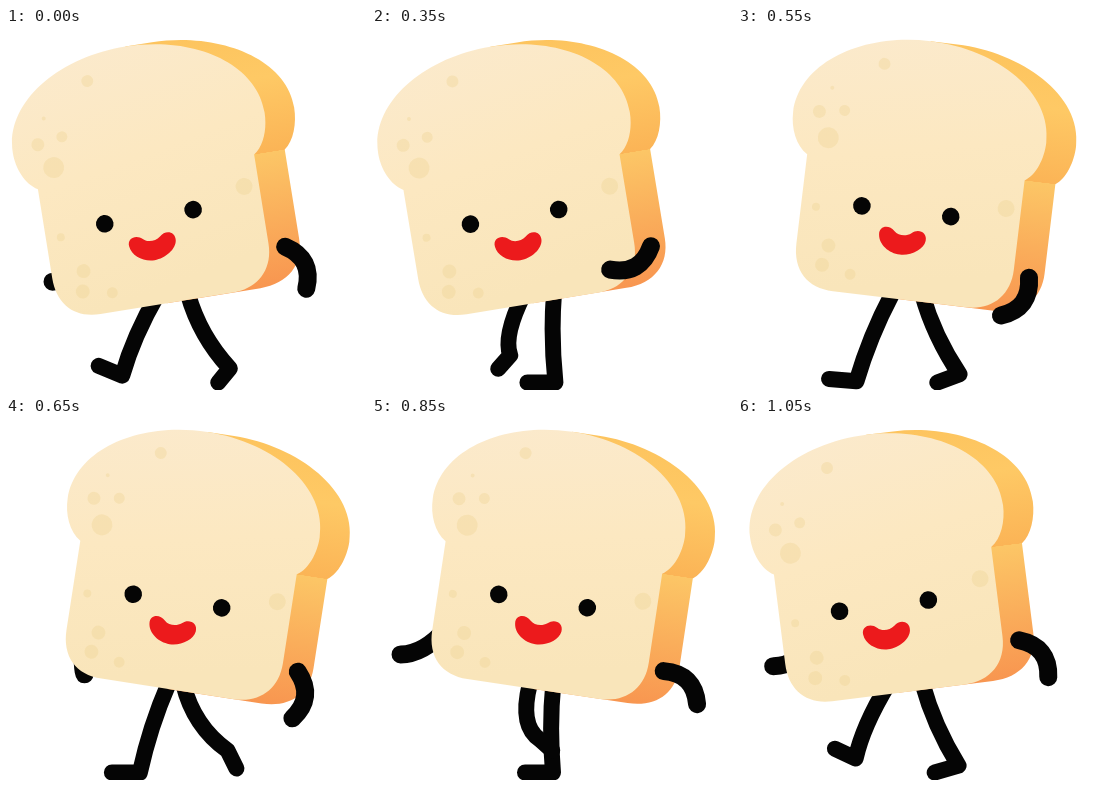
Write an HTML page that moves like this. It is 360 px wide and 362 px high and loops after 1.1 s.

```html
<!DOCTYPE html>
<html lang="en">
<head>
<meta charset="utf-8">
<title>Walking toast</title>
<style>
  html, body { margin: 0; width: 100%; height: 100%; overflow: hidden; background: #fff; }
  svg { display: block; width: 100vw; height: 100vh; }
  .limb { fill: none; stroke: #050505; stroke-linecap: round; stroke-linejoin: round; }
  .leg { stroke-width: 16; }
  .arm { stroke-width: 18; }
</style>
</head>
<body>
<svg viewBox="0 0 360 362">
  <defs>
    <linearGradient id="face" x1="0" y1="0" x2=".2" y2="1">
      <stop offset="0" stop-color="#fbeacd"/>
      <stop offset=".5" stop-color="#fce8c1"/>
      <stop offset="1" stop-color="#f9e5ba"/>
    </linearGradient>
    <linearGradient id="crust" gradientUnits="userSpaceOnUse" x1="0" y1="13" x2="0" y2="273">
      <stop offset="0" stop-color="#fdc45e"/>
      <stop offset=".2" stop-color="#fec965"/>
      <stop offset=".488" stop-color="#fbb456"/>
      <stop offset=".489" stop-color="#fcc666"/>
      <stop offset="1" stop-color="#f89650"/>
    </linearGradient>
  </defs>
  <path id="legB" class="limb leg"/>
  <path id="legA" class="limb leg"/>
  <path id="armL" class="limb arm"/>
  <g id="body">
    <path fill="url(#crust)" d="M161 13H188C252 13 318 48 318 100C318 116 312 133 302 140V230C302 257 284 273 256 273H161Z"/>
    <path fill="url(#face)" d="M52 140C40 133 33 116 33 100C33 50 92 13 161 13S288 50 288 100C288 116 282 133 271 140V230C271 257 253 273 228 273H94C68 273 52 257 52 230Z"/>
    <g id="spots" fill="#efd596" opacity=".38"></g>
    <circle cx="112.500" cy="184.700" r="8.800" fill="#050505"/>
    <circle cx="202" cy="184.700" r="8.800" fill="#050505"/>
    <path fill="#ec1a1c" d="M133 211C132 202 142 200 148 206C152 210 160 210 165 206C171 200 181 203 180 212C179 221 167 228.500 156 228.500S134 221 133 211Z"/>
  </g>
  <path id="armR" class="limb arm"/>
</svg>
<script>
const LOOP = 1100, STEP = 50;
const PIVOT = { x: 175, y: 276 };
const { sin, cos, max, min, tanh, PI } = Math;
const el = id => document.getElementById(id);
const rad = degrees => degrees * PI / 180;

// Cosine over the loop, equal to 1 at the time "peak".
const wave = (t, peak, cycles = 1) => cos(2 * PI * cycles * (t - peak) / LOOP);

// The body rocks quickly between two held leans.
const tilt = t => 9.6 * tanh(2.5 * (wave(t, 732) - 0.11)) - 0.4;

function onBody(x, y, degrees) {
  const c = cos(rad(degrees)), s = sin(rad(degrees));
  const dx = x - PIVOT.x, dy = y - PIVOT.y;
  return [PIVOT.x + dx * c - dy * s, PIVOT.y + dx * s + dy * c];
}

const setPath = (id, d) => el(id).setAttribute("d", d);

// One step cycle: the foot slides right on the ground, then lifts and swings left.
function drawLeg(id, t) {
  const lift = max(0, 0.3 + wave(t, 820)) / 1.3;
  const hipX = 168 - 18 * wave(t, -80);
  const ankleX = 170 - 53 * wave(t, 20) + 5 * wave(t, 157, 2);
  const ankleY = 354.5 - 33 * lift;
  const kneeX = (hipX + ankleX) / 2 - 4 - 12 * lift;
  const drop = rad(190 * lift * wave(t, 720));
  const foot = 28 - 12 * lift;
  const toeX = ankleX - foot * cos(drop);
  const toeY = min(354.5, ankleY + foot * sin(drop));
  setPath(id, `M${hipX} 266Q${kneeX} 308 ${ankleX} ${ankleY}L${toeX} ${toeY}`);
}

// The near arm swings like a bent pendulum.
function drawNearArm(t, [x, y]) {
  const length = 47, bend = 20;
  const swing = rad(56 * wave(t, 930) - 5);
  const dx = sin(swing), dy = cos(swing);
  const elbow = [x + dx * length / 2 + dy * bend, y + dy * length / 2 - dx * bend];
  setPath("armR", `M${x} ${y}Q${elbow.join(" ")} ${x + dx * length} ${y + dy * length}`);
}

// The far arm reaches out from behind the slice.
function drawFarArm(t, [x, y]) {
  const handX = 77 - 54 * wave(t, 930);
  const handY = 246 + 11 * wave(t, 620, 2);
  setPath("armL", `M${x} ${y}Q${(x + handX) / 2} ${handY} ${handX} ${handY}`);
}

function draw(t) {
  const angle = tilt(t);
  el("body").setAttribute("transform", `rotate(${angle} ${PIVOT.x} ${PIVOT.y})`);
  drawLeg("legA", t);
  drawLeg("legB", t - 510);
  drawNearArm(t, onBody(287, 236, angle));
  drawFarArm(t, onBody(66, 226, angle));
}

const spots = [
  [118, 41, 6], [59, 96, 6.5], [84, 92, 5.5], [71, 121, 10.5], [69, 71, 2],
  [256, 170, 8.5], [67, 191, 4], [84, 228, 7], [80, 248, 7], [109, 254, 5.5]
];
el("spots").innerHTML = spots.map(([x, y, r]) => `<circle cx="${x}" cy="${y}" r="${r}"/>`).join("");

const start = performance.now();
function tick() {
  const t = (performance.now() - start) % LOOP;
  draw(Math.floor(t / STEP) * STEP);
  requestAnimationFrame(tick);
}
tick();
</script>
</body>
</html>
```
